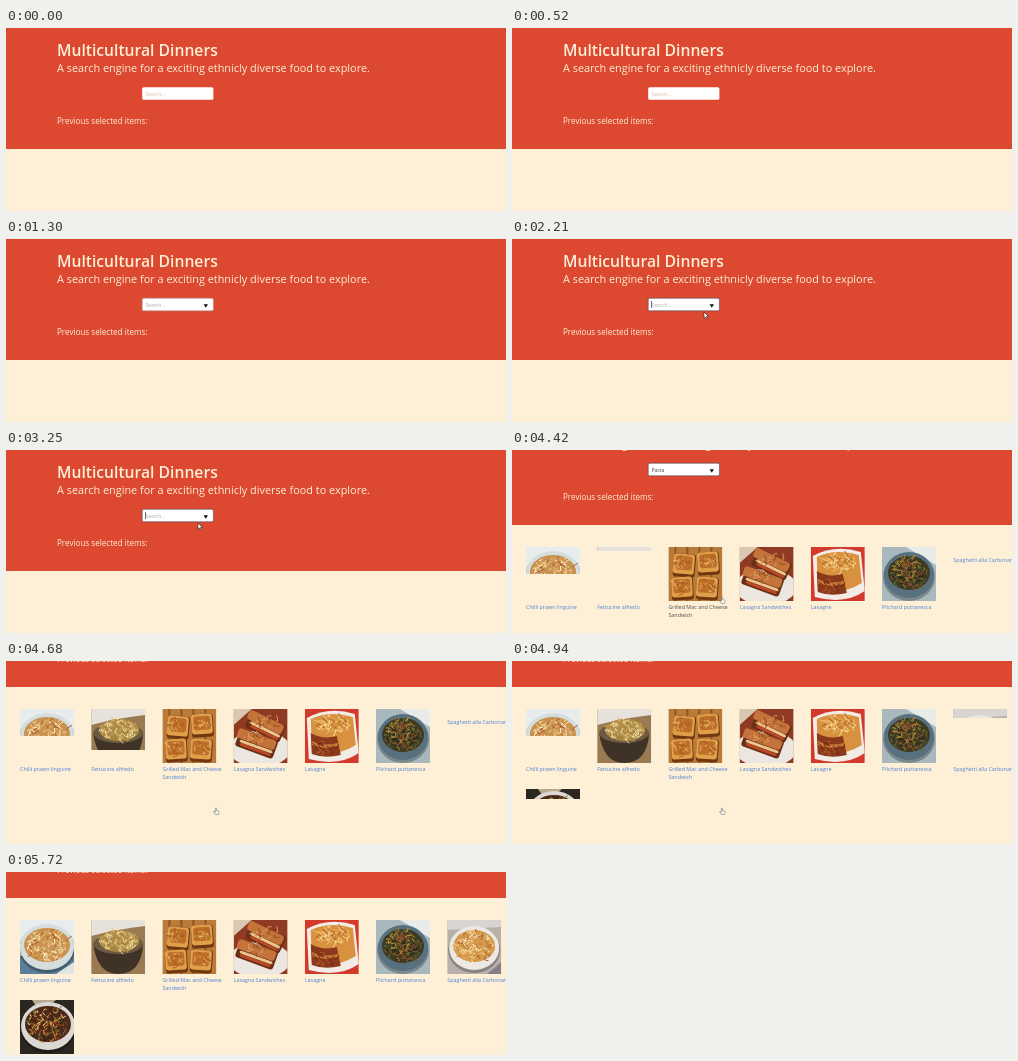
An HTML page that plays this animation: 500x183 px, repeating every 6630 ms.

```html
<!DOCTYPE html>
<html lang="en">
<head>
<meta charset="utf-8">
<title>Multicultural Dinners</title>
<style>
  html, body { margin: 0; width: 100%; height: 100%; overflow: hidden; background: #fef0d6; }
  body > svg { display: block; width: 100%; height: 100%; }
  text { font-family: "Open Sans", "Noto Sans", sans-serif; fill: #fef0d6; }
  .title { font-size: 15.7px; font-weight: 600; }
  .lead { font-size: 10.88px; }
  .label { font-size: 8.1px; }
  .field { font-size: 5px; }
  .caption { font-size: 5.4px; fill: #4f80d4; }
</style>
</head>
<body>
<svg id="stage" viewBox="0 0 500 183">
  <g id="page">
    <rect width="500" height="121" fill="#dc4830"/>
    <text class="title" x="51" y="28">Multicultural Dinners</text>
    <text class="lead" x="51" y="44">A search engine for a exciting ethnicly diverse food to explore.</text>
    <rect id="box" x="136.200" y="59.2" width="71.2" height="12.6" rx="1.5" fill="#fff"/>
    <text id="query" class="field" x="139.5" y="67.6"></text>
    <rect id="caret" x="139" y="62" width="0.7" height="7" fill="#333"/>
    <path id="arrow" d="M197.6 65.3h4.400l-2.200 3.500z" fill="#111"/>
    <text class="label" x="51" y="96">Previous selected items:</text>
    <g id="results"></g>
  </g>
  <path id="pointer" d="M0 0v6.2l1.5-1.3 1 2.1 1-.5-1-2h2z" fill="#fff" stroke="#222" stroke-width=".6"/>
  <path id="hand" d="M-.6-2.6q.6-.8 1.2 0v2.2l2 .5q.6.2.4 1l-.6 2.4h-3L-2.4 1q0-.8.7-.5l1.1.9z"
        fill="#fff" stroke="#555" stroke-width=".5"/>
</svg>
<script>
const LOOP = 6630, STEP = 130, SIZE = 54, LEFT = 14, TOP = 143, COLUMN = 71.2, ROW = 80, SCROLL = 95;
const byId = id => document.getElementById(id);

function add(parent, tag, attrs, text = "") {
  const node = document.createElementNS("http://www.w3.org/2000/svg", tag);
  set(node, attrs);
  node.textContent = text;
  return parent.appendChild(node);
}
function set(node, attrs) {
  for (const key in attrs) node.setAttribute(key, attrs[key]);
}
const show = (node, on) => set(node, { visibility: on ? "visible" : "hidden" });

function seeded(seed) {
  return () => (seed = (seed * 16807) % 2147483647) / 2147483647;
}

// Drawing helpers for the dishes
const fill = (p, d, color) => add(p, "path", { d, fill: color });
const oval = (p, cx, cy, rx, ry, color) => add(p, "ellipse", { cx, cy, rx, ry, fill: color });
const backdrop = (p, color) => add(p, "rect", { width: SIZE, height: SIZE, fill: color });
const slab = (p, x, y, width, height, color, turn = 0) =>
  add(p, "rect", { x, y, width, height, rx: 3, fill: color,
    transform: `rotate(${turn} ${x + width / 2} ${y + height / 2})` });

function strands(p, [cx, cy, rx, ry], colors, count, seed) {
  const random = seeded(seed * 7919);
  const bend = () => (random() * 10 - 5).toFixed(1);
  for (let i = 0; i < count; i++) {
    const angle = random() * 6.283, reach = Math.sqrt(random()) * 0.92;
    const x = cx + Math.cos(angle) * rx * reach, y = cy + Math.sin(angle) * ry * reach;
    add(p, "path", { d: `M${x} ${y}q${bend()} ${bend()} ${bend()} ${bend()}`, fill: "none",
      stroke: colors[i % colors.length], "stroke-width": 1, "stroke-linecap": "round" });
  }
}

function bowl(p, rim, base, colors, area, seed) {
  const [cx, cy, rx, ry] = area;
  oval(p, cx, cy + 4, rx + 5, ry + 7, "#0004");
  oval(p, cx, cy + 2, rx + 4, ry + 6, rim);
  oval(p, cx, cy, rx, ry, base);
  strands(p, area, colors, 110, seed);
}

function toast(p, x, y, turn, seed) {
  slab(p, x, y, 22, 23, "#6f3610", turn);
  slab(p, x, y, 21, 20, "#e0a04a", turn);
  slab(p, x + 2, y + 2, 17, 14, "#bd6f2a", turn);
  strands(p, [x + 10, y + 9, 8, 6], ["#dd9a48", "#a85820", "#e8b866"], 14, seed);
}

function halfSandwich(p, x, y, width, turn, seed) {
  slab(p, x, y, width, 19, "#6b2f16", turn);
  slab(p, x, y, width, 10, "#c4743a", turn);
  slab(p, x + 2, y + 11, width - 5, 3, "#ecc58e", turn);
  slab(p, x + 2, y + 14, width - 7, 3, "#bb4826", turn);
  strands(p, [x + width / 2, y + 5, width / 2 - 5, 4], ["#9a4d22", "#dc9a5c"], 16, seed);
}

const paint = {
  linguine(p) {
    backdrop(p, "#e9ecec");
    fill(p, "M0 36L54 30V54H0z", "#5b7f96");
    bowl(p, "#d5dedf", "#c9924e", ["#f3dca6", "#d9a85e", "#fff0cc", "#a9572c", "#e7c07c"], [27, 25, 23, 17], 3);
    fill(p, "M36 54L54 42V54z", "#dfe4e4");
  },
  fettucine(p) {
    backdrop(p, "#9a7a52");
    fill(p, "M0 0H54V6Q27 9 0 16z", "#e6e1da");
    fill(p, "M2 24Q27 14 52 24Q50 54 27 54Q6 54 2 24z", "#3f3328");
    oval(p, 27, 24, 25, 10, "#6c5a42");
    oval(p, 28, 21, 20, 11, "#b08c48");
    strands(p, [28, 21, 20, 11], ["#e3c980", "#a07c3a", "#f2e2ae", "#c9a458"], 95, 5);
  },
  grilled(p) {
    backdrop(p, "#b97a3a");
    for (let x = 6; x < SIZE; x += 12) fill(p, `M${x} 0h2v54h-2z`, "#8e5523");
    toast(p, 5, 7, 5, 21);
    toast(p, 29, 5, -4, 22);
    toast(p, 3, 30, -3, 23);
    toast(p, 28, 30, 4, 24);
  },
  sandwiches(p) {
    backdrop(p, "#8f3a22");
    fill(p, "M0 0H18L0 16z", "#d9c9b2");
    oval(p, 26, 40, 31, 18, "#ece6e0");
    halfSandwich(p, 13, 8, 38, 26, 31);
    halfSandwich(p, 3, 25, 40, 20, 32);
  },
  lasagne(p) {
    backdrop(p, "#d23a2c");
    fill(p, "M2 9Q24-3 50 5L54 44Q34 58 4 50z", "#f3ece6");
    fill(p, "M6 10Q25 1 48 8L51 36Q32 48 7 44z", "#d8923f");
    fill(p, "M6 24Q18 31 32 27L36 46Q20 50 7 45z", "#8a3a1a");
    fill(p, "M7 32Q18 38 33 34V37Q18 41 7 36z", "#cf7d38");
    strands(p, [28, 15, 20, 9], ["#f2cb78", "#b4602a", "#ebb75c", "#f7dfa0"], 55, 9);
    strands(p, [21, 39, 13, 6], ["#6b2814", "#b0562a"], 18, 10);
  },
  pilchard(p) {
    backdrop(p, "#a9b8bd");
    fill(p, "M24 0H54V18z", "#e9ebe8");
    bowl(p, "#587180", "#3f3a24", ["#8a6a2a", "#262417", "#b98e3c", "#5d6a30", "#a3552a"], [27, 26, 21, 17], 11);
  },
  spaghetti(p) {
    backdrop(p, "#b9b0aa");
    fill(p, "M0 0H54V7L0 10z", "#d8d4d2");
    bowl(p, "#ece8e4", "#d39a4c", ["#f4d896", "#c98640", "#fbe9bd", "#b35f34", "#e5b562"], [27, 26, 21, 16], 13);
    fill(p, "M40 54L54 42V54z", "#83808a");
  },
  stirFry(p) {
    backdrop(p, "#2a2721");
    fill(p, "M12 0H36L30 5 16 6z", "#b9a98e");
    bowl(p, "#dcd8d4", "#4a2a1a", ["#d98c38", "#2b1e18", "#f0bd66", "#a3471f", "#6d7034"], [28, 24, 23, 18], 17);
  }
};

// Each dish: caption lines, painter, and [time, loaded share] pairs
const dishes = [
  [["Chilli prawn linguine"], "linguine", [[4290, .25], [4420, .5], [5590, .8], [5720, 1]]],
  [["Fettucine alfredo"], "fettucine", [[4420, .08], [4550, .4], [4680, .75], [4810, 1]]],
  [["Grilled Mac and Cheese", "Sandwich"], "grilled", [[4160, 1]]],
  [["Lasagna Sandwiches"], "sandwiches", [[4160, 1]]],
  [["Lasagne"], "lasagne", [[4160, 1]]],
  [["Pilchard puttanesca"], "pilchard", [[4290, .6], [4420, 1]]],
  [["Spaghetti alla Carbonara"], "spaghetti", [[4810, .17], [5590, .6], [5720, 1]]],
  [[], "stirFry", [[4940, .19], [5590, .6], [5720, 1]]]
].map(([lines, painter, loading], i) => {
  const x = LEFT + (i % 7) * COLUMN, y = TOP + Math.floor(i / 7) * ROW;
  const photo = add(byId("results"), "svg", { x, y, width: SIZE, height: 0, overflow: "hidden" });
  paint[painter](photo);
  const captions = lines.map(line => add(byId("results"), "text", { class: "caption", x }, line));
  return { y, photo, captions, loading };
});

// Value of the last [time, value] pair reached
const latest = (pairs, t, start) => pairs.reduce((value, [at, next]) => t >= at ? next : value, start);

function ease(t, from, to) {
  const k = Math.min(1, Math.max(0, (t - from) / (to - from)));
  return (1 - Math.cos(Math.PI * k)) / 2;
}

function draw(t) {
  const hovered = t >= 1170, focused = t >= 2080;
  const typed = latest([[3510, "P"], [3640, "Pas"], [3770, "Pasta"]], t, "");

  byId("query").textContent = typed || "Search...";
  byId("query").style.fill = typed ? "#444" : hovered ? "#b3aaa9" : "#e3b3aa";
  set(byId("box"), { stroke: focused ? "#4a4c60" : hovered ? "#a8929a" : "none", "stroke-width": .6 });
  show(byId("arrow"), hovered);
  show(byId("caret"), focused && !typed && (t < 2600 || t >= 3250));

  const scroll = Math.round(SCROLL * ease(t, 4150, 4700));
  set(byId("page"), { transform: `translate(0 ${-scroll})` });
  show(byId("results"), t >= 4030);
  for (const { y, photo, captions, loading } of dishes) {
    const share = latest(loading, t, 0);
    set(photo, { height: Math.round(SIZE * share), display: share ? "inline" : "none" });
    captions.forEach((caption, line) => set(caption, { y: y + (share ? 61.5 : 15) + line * 8.4 }));
  }
  const hoverDish = t >= 4160 && t < 4680;
  dishes[2].captions.forEach(caption => caption.style.fill = hoverDish ? "#4d4a48" : "");

  const move = ease(t, 3770, 4160);
  const transform = `translate(${192 + 18 * move} ${73 + 77 * move})`;
  set(byId("pointer"), { transform });
  set(byId("hand"), { transform });
  show(byId("pointer"), t >= 2080 && t < 4030);
  show(byId("hand"), t >= 4030 && t < 5200);
}

const start = performance.now();
function tick() {
  const t = (performance.now() - start) % LOOP;
  draw(Math.floor(t / STEP) * STEP);
  requestAnimationFrame(tick);
}
tick();
</script>
</body>
</html>
```
